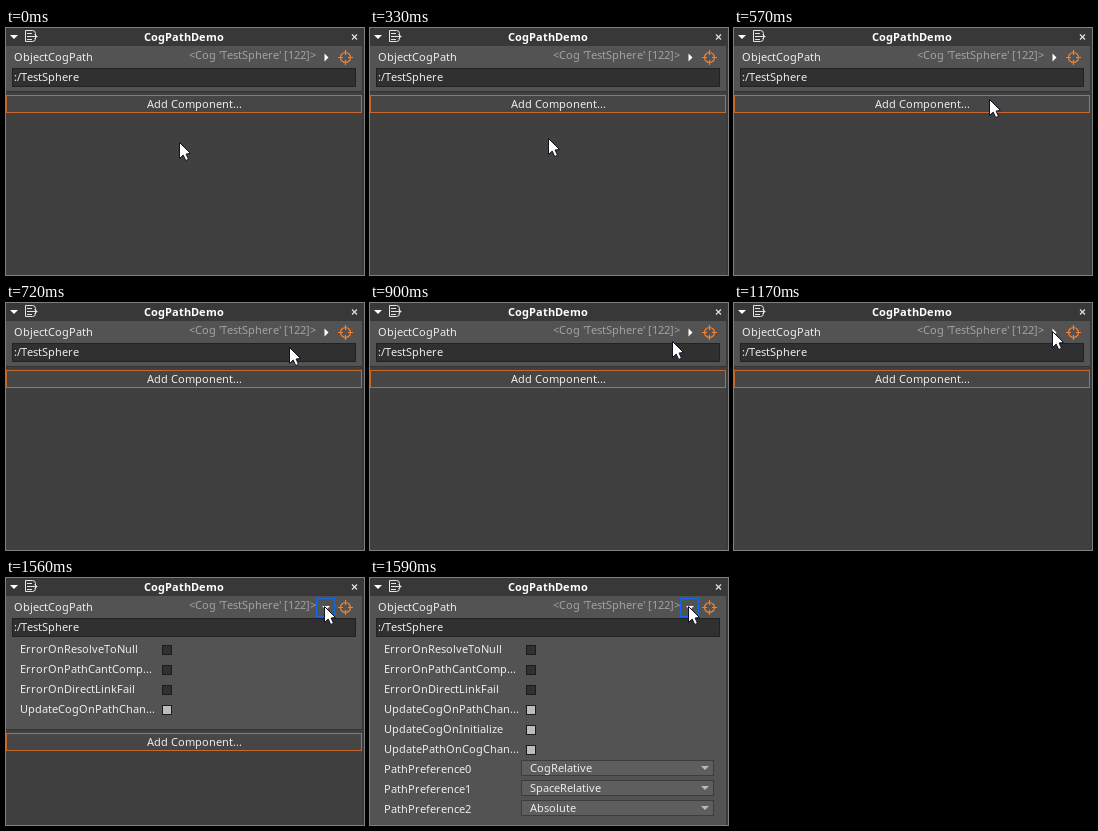
An HTML page with a canvas for the animation above (3540 ms loop, 358 by 247 pixels).

```html
<!DOCTYPE html>
<html>
<head>
<meta charset="utf-8">
<style>
html, body { margin: 0; width: 100%; height: 100%; overflow: hidden; background: #404040; }
canvas { display: block; }
</style>
</head>
<body>
<canvas id="stage" width="358" height="247"></canvas>
<script>
const ctx = document.getElementById('stage').getContext('2d');
const LOOP = 3540, STEP = 30, ROW = 20;

// Pointer tip: time, x, y
const path = [[300, 173, 114], [330, 178, 110], [570, 255, 71], [780, 291, 35],
  [840, 292, 40], [900, 302, 38], [1170, 318, 28]];

const checks = ['ErrorOnResolveToNull', 'ErrorOnPathCantComp...', 'ErrorOnDirectLinkFail',
  'UpdateCogOnPathChan...', 'UpdateCogOnInitialize', 'UpdatePathOnCogChan...'];
const choices = ['CogRelative', 'SpaceRelative', 'Absolute'];

function rect(x, y, w, h, fill) {
  ctx.fillStyle = fill;
  ctx.fillRect(x, y, w, h);
}

function box(x, y, w, h, fill, edge) {
  rect(x, y, w, h, edge);
  rect(x + 1, y + 1, w - 2, h - 2, fill);
}

function shape(d, fill, edge, width = 1) {
  const p = new Path2D(d);
  if (fill) {
    ctx.fillStyle = fill;
    ctx.fill(p);
  }
  if (edge) {
    ctx.strokeStyle = edge;
    ctx.lineWidth = width;
    ctx.stroke(p);
  }
}

// Sets each letter on whole pixels; align is 0 left, 0.5 centre, 1 right
function text(str, x, y, align = 0, color = '#ececec', weight = 400) {
  ctx.font = `${weight} 11px "Noto Sans", "Open Sans", sans-serif`;
  ctx.fillStyle = color;
  const advance = c => Math.round(ctx.measureText(c).width);
  const width = [...str].reduce((sum, c) => sum + advance(c), 0);
  x = Math.round(x - width * align);
  for (const c of str) {
    ctx.fillText(c, x, y);
    x += advance(c);
  }
}

// Smooth curve through the path, at rest at both ends
function pointerAt(t) {
  const last = path.length - 1;
  if (t <= path[0][0]) return path[0].slice(1);
  if (t >= path[last][0]) return path[last].slice(1);
  const i = path.findIndex(p => p[0] > t) - 1;
  const a = path[i], b = path[i + 1], span = b[0] - a[0], u = (t - a[0]) / span;
  const slope = (k, n) => k === 0 || k === last ? 0 :
    (path[k + 1][n] - path[k - 1][n]) / (path[k + 1][0] - path[k - 1][0]);
  return [1, 2].map(n => Math.round(
    a[n] + (b[n] - a[n]) * u * u * (3 - 2 * u) +
    span * u * (1 - u) * (slope(i, n) * (1 - u) - slope(i + 1, n) * u)));
}

function titleBar() {
  rect(0, 0, 358, 18, '#383838');
  shape('M4 7h8l-4 4z', '#fff');
  shape('M19.5 2.5h7q3 0 3 3v5q0 3-3 3h-7zM21 5.5h5M21 8.5h10M21 11.5h5M28.5 6l2.5 2.5-2.5 2.5', null, '#e4e4e4');
  text('CogPathDemo', 178, 13, 0.5, '#fff', 700);
  shape('M346 6.5l5 5m0-5l-5 5', null, '#e0e0e0', 1.2);
}

function objectRow(open) {
  text('ObjectCogPath', 8, 33);
  text("<Cog 'TestSphere' [122]>", 310, 31, 1, '#a2a2a2');
  if (open) box(310, 20, 19, 19, '#535353', '#1769e0');
  shape(open ? 'M316 28h8l-4 4z' : 'M318.5 25.5l4 4-4 4z', '#fff');
  shape('M334.5 29.5a5 5 0 1 0 10 0a5 5 0 1 0-10 0M332 29.5h5m5 0h5M339.5 22v5m0 5v5', null, '#f58030', 1.2);
  box(6, 40, 344, 19, '#303030', '#222');
  text(':/TestSphere', 8, 53);
}

function rows(bottom) {
  ctx.save();
  ctx.beginPath();
  ctx.rect(0, 62, 358, bottom - 66);
  ctx.clip();
  [...checks, ...choices].forEach((label, i) => {
    const y = 71 + i * ROW, n = i - checks.length;
    if (n < 0) {
      text(label, 14, y + 4);
      box(156, y - 4, 10, 10, i < 3 ? '#303030' : '#bcbcbc', '#1c1c1c');
    } else {
      text('PathPreference' + n, 14, y + 4);
      box(151, y - 9, 193, 16, '#5e5e5e', '#3c3c3c');
      text(label, 160, y + 3);
      shape(`M331 ${y - 3}h8l-4 4z`, '#b8b8b8');
    }
  });
  ctx.restore();
}

function pointer(x, y) {
  ctx.save();
  ctx.translate(x + 0.5, y + 0.5);
  shape('M0 0v16l3.7-3.4 2.5 5.4 2.8-1.2-2.4-5.3 4.4-.5z', '#fff', '#111122');
  ctx.restore();
}

function draw(t) {
  const open = t >= 1530;
  const grow = t < 1560 ? 0 : t < 1590 ? 88 : 187;
  const bottom = 63 + grow;

  rect(0, 0, 358, 247, '#404040');
  rect(0, 18, 356, bottom - 18, '#535353');
  rect(0, bottom, 356, 1, '#333');
  rect(356, 18, 2, 229, '#3a3a3a');
  titleBar();
  objectRow(open);
  if (grow) rows(bottom);
  box(0, 67 + grow, 356, 18, '#464646', '#c5682f');
  text('Add Component...', 188.5, 80 + grow, 0.5);
  pointer(...pointerAt(t));
}

const start = performance.now();
function tick() {
  const t = (performance.now() - start) % LOOP;
  draw(Math.floor(t / STEP) * STEP);
  requestAnimationFrame(tick);
}
tick();
</script>
</body>
</html>
```
